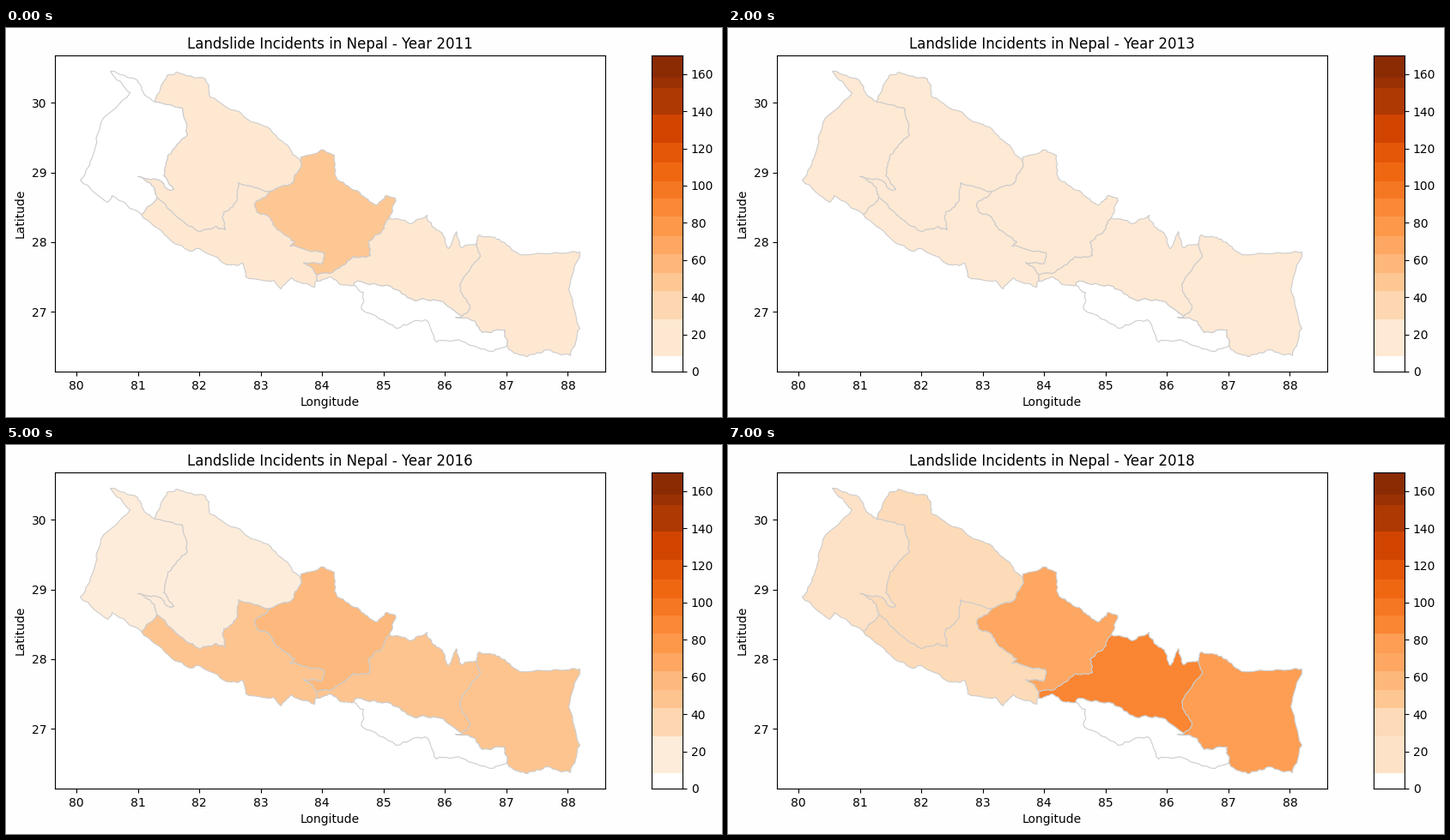
Animation of 834x454 px, one loop 8 s. Source, as a matplotlib script:

```python
import numpy as np
import matplotlib.pyplot as plt
from matplotlib.animation import FuncAnimation
from matplotlib.patches import Polygon

W, H, DPI = 834, 454, 100
TOP, BOTTOM = 32, 401
LEFT, RIGHT = 57, 698
VMAX = 170
rng = np.random.default_rng(7)


def border(*points):
    """Line through key points, roughened by capped midpoint displacement."""
    p = np.array(points, float)
    for _ in range(3):
        d = np.diff(p, axis=0)
        size = np.hypot(d[:, 0], d[:, 1])
        shift = rng.uniform(-1, 1, len(d)) * np.minimum(0.2 * size, 1.5)
        normal = np.column_stack([-d[:, 1], d[:, 0]]) / size[:, None]
        mid = (p[:-1] + p[1:]) / 2 + normal * shift[:, None]
        p = np.insert(p, range(1, len(p)), mid, axis=0)
    return p


def ring(*lines):
    """Closed outline: each line is turned round if needed to join the last."""
    path = lines[0]
    for line in lines[1:]:
        if not np.allclose(path[-1], line[0]):
            line = line[::-1]
        path = np.vstack([path, line])
    return path


# Points where borders meet, in stage pixels
NW, N, NE, E = (173, 86), (343, 157), (446, 221), (548, 251)
SE, S, SW = (583, 370), (404, 300), (157, 217)
WEST, MID, SOUTH, DIP, EAST = (175, 197), (307, 190), (361, 287), (361, 295), (531, 336)

# Outer borders
far_west_edge = border(
    NW, (160, 76), (153, 61), (121, 50), (144, 75), (110, 110), (101, 147),
    (86, 177), (118, 203), (123, 195), SW)
karnali_edge = border(
    NW, (175, 78), (187, 55), (198, 51), (232, 59), (237, 80), (276, 102),
    (304, 115), (330, 140), N)
gandaki_edge = border(
    N, (343, 150), (366, 142), (382, 148), (385, 176), (412, 192), (430, 206),
    (442, 195), (453, 198), NE)
bagmati_edge = border(
    NE, (470, 228), (490, 218), (496, 231), (508, 240), (515, 257), (524, 237),
    (530, 256), E)
koshi_edge = border(
    E, (551, 241), (574, 246), (598, 264), (654, 262), (668, 261), (655, 305),
    (668, 350), (657, 382), (630, 375), (607, 383), (588, 376), SE)
madhesh_edge = border(
    S, (416, 308), (414, 328), (454, 350), (488, 340), (501, 366), (530, 365),
    (566, 377), SE)
lumbini_edge = border(
    SW, (188, 244), (214, 260), (225, 257), (257, 276), (275, 274), (279, 290),
    (311, 294), (320, 304), (332, 291), (359, 302), DIP)
bagmati_south = border(DIP, (377, 290), (389, 299), S)

# Inner borders
west_karnali = border(
    NW, (205, 93), (211, 124), (188, 148), (183, 172), (195, 188), (188, 188),
    (178, 177), (153, 173), (168, 181), WEST)
west_lumbini = border(WEST, SW)
karnali_lumbini = border(
    WEST, (210, 229), (226, 237), (244, 231), (255, 235), (253, 214),
    (266, 204), (270, 180), MID)
karnali_gandaki = border(N, (333, 180), MID)
lumbini_gandaki = border(
    MID, (289, 206), (291, 213), (305, 219), (313, 232), (336, 249), (330, 254),
    (370, 262), (367, 275), (346, 273), (353, 277), SOUTH)
lumbini_bagmati = border(SOUTH, DIP)
gandaki_bagmati = border(
    NE, (437, 237), (421, 250), (424, 265), (404, 266), (376, 286), SOUTH)
madhesh_bagmati = border(S, (408, 295), (448, 301), (474, 317), (505, 318), EAST)
bagmati_koshi = border(E, (552, 266), (528, 299), (540, 327), EAST)
madhesh_koshi = border(EAST, (523, 337), (543, 341), (554, 355), (581, 352), SE)

PROVINCES = [
    ring(koshi_edge, madhesh_koshi, bagmati_koshi),
    ring(madhesh_edge, madhesh_koshi, madhesh_bagmati),
    ring(bagmati_edge, bagmati_koshi, madhesh_bagmati, bagmati_south,
         lumbini_bagmati, gandaki_bagmati),
    ring(gandaki_edge, gandaki_bagmati, lumbini_gandaki, karnali_gandaki),
    ring(lumbini_edge, lumbini_bagmati, lumbini_gandaki, karnali_lumbini,
         west_lumbini),
    ring(karnali_edge, karnali_gandaki, karnali_lumbini, west_karnali),
    ring(far_west_edge, west_lumbini, west_karnali),
]

# Incidents per year: Koshi, Madhesh, Bagmati, Gandaki, Lumbini, Karnali, Far West
COUNTS = {
    2011: [18, 0, 18, 48, 18, 18, 0],
    2012: [17, 0, 17, 17, 17, 17, 0],
    2013: [17, 0, 17, 17, 17, 17, 17],
    2014: [16, 0, 16, 16, 16, 16, 16],
    2015: [10, 0, 13, 13, 0, 13, 13],
    2016: [50, 0, 50, 57, 50, 13, 13],
    2017: [42, 0, 60, 16, 16, 16, 16],
    2018: [74, 0, 90, 68, 32, 32, 25],
}
YEARS = list(COUNTS)
BAND_EDGES = [0, 8.3, 28, 43.5, 53, 63, 73, 83.5, 93, 102.5, 112.5, 123, 138,
              152.5, 158, VMAX]
BANDS = list(zip(BAND_EDGES, BAND_EDGES[1:]))


def shade(value):
    return "white" if value < BAND_EDGES[1] else plt.cm.Oranges(value / VMAX)


def band_shade(low, high, counts):
    """A band takes the tone of the counts inside it, else its middle tone."""
    inside = [c for c in counts if low <= c < high]
    return shade(np.mean(inside) if inside else (low + high) / 2)


def pixel_axes(left, right):
    return fig.add_axes([left / W, 1 - BOTTOM / H, (right - left) / W,
                         (BOTTOM - TOP) / H])


fig = plt.figure(figsize=(W / DPI, H / DPI), dpi=DPI, facecolor="#fefefe")

# Map axes work in pixels; ticks carry the degrees
ax = pixel_axes(LEFT, RIGHT)
ax.set_xlim(LEFT, RIGHT)
ax.set_ylim(BOTTOM, TOP)
ax.set_xticks(81.98 + 71.56 * np.arange(9), range(80, 89))
ax.set_yticks(87.2 + 81.36 * np.arange(4), range(30, 26, -1))
ax.set_xlabel("Longitude")
ax.set_ylabel("Latitude")
title = ax.set_title("")
# Border points name pixels, so they sit at pixel centres
shapes = [ax.add_patch(Polygon(p + 0.5, edgecolor="0.8", lw=0.8))
          for p in PROVINCES]

bar = pixel_axes(752, 788)
bar.set_xlim(0, 1)
bar.set_ylim(0, VMAX)
bar.set_xticks([])
bar.set_yticks(range(0, VMAX, 20))
bar.yaxis.tick_right()
strips = [bar.axhspan(*band, lw=0, antialiased=False) for band in BANDS]


def draw(i):
    year = YEARS[i]
    counts = COUNTS[year]
    title.set_text(f"Landslide Incidents in Nepal - Year {year}")
    for shape, count in zip(shapes, counts):
        shape.set_facecolor(shade(count))
    for strip, band in zip(strips, BANDS):
        # The lowest band is always white
        strip.set_facecolor("white" if band[0] == 0 else band_shade(*band, counts))
    return [title, *shapes, *strips]


anim = FuncAnimation(fig, draw, frames=len(YEARS), interval=1000, repeat=True,
                     repeat_delay=0)
plt.show()
```
